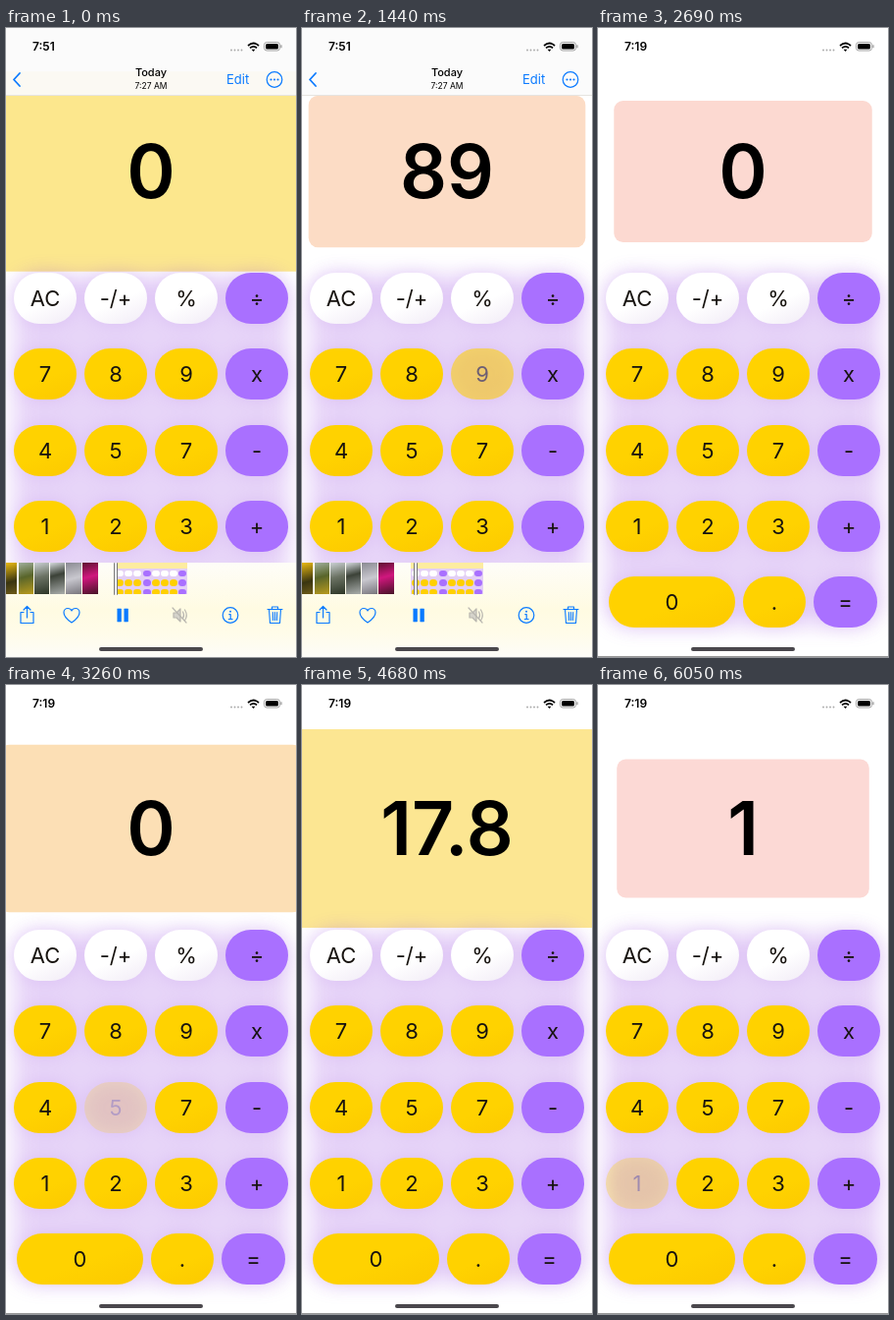
An HTML page for the animation above (6090 ms loop, 296x640 px).

```html
<!DOCTYPE html>
<html lang="en">
<head>
<meta charset="utf-8">
<title>Calculator</title>
<style>
html, body { margin: 0; width: 100%; height: 100%; overflow: hidden; background: #fff; }
body { position: relative; font-family: Inter, Roboto, sans-serif; color: #000; }
#stage { position: absolute; left: 0; top: 0; width: 296px; height: 640px; overflow: hidden; background: #fff; }
#stage div, #stage svg { position: absolute; }
#panel { left: 20px; top: 76px; width: 256px; height: 140px; border-radius: 9px; }
#glow { inset: 0; }
#haze { left: 7px; top: 252px; width: 282px; height: 356px; border-radius: 24px; background: #a35be4; opacity: .25; filter: blur(11px); }
#shades { inset: 0; opacity: .16; filter: blur(9px); }
#value { left: 0; width: 296px; top: 101px; line-height: 90px; font-size: 75px; font-weight: 600; text-align: center; }
.key { height: 52px; line-height: 52px; border-radius: 26px; font-size: 22px; text-align: center; color: #17130f; }
.white { background: linear-gradient(155deg, #fff 55%, #f1ebf6); }
.gold { background: linear-gradient(160deg, #ffd200 55%, #fcc900); }
.violet { background: #a970ff; }
#chrome { inset: 0; }
#head { left: 0; top: 0; width: 296px; height: 68px; background: rgba(251,251,251,.93); border-bottom: 1px solid #e6e4e0; }
#foot { left: 0; top: 544px; width: 296px; height: 96px; background: linear-gradient(#fefdf8, #fffbe2 50%, #fffce9 75%, #fdfcf8); }
.mid { left: 0; width: 296px; text-align: center; }
.thumb { top: 0; height: 32px; }
#strip { left: 111px; top: 0; width: 74px; height: 32px; overflow: hidden; background: #e3cff6; }
#head1 { top: 0; left: 0; width: 2px; height: 33px; background: #fff; border: solid #777; border-width: 0 1px; border-radius: 1px; }
#clock { left: 27px; top: 11px; line-height: 16px; font-size: 12px; font-weight: 600; }
#home { left: 95px; top: 630px; width: 106px; height: 3.5px; border-radius: 2px; background: #4a474c; }
#edge { left: 0; top: 639px; width: 296px; height: 1px; background: #999; }
</style>
</head>
<body>
<div id="stage">
  <div id="panel"></div>
  <div id="glow"><div id="haze"></div><div id="shades"></div></div>
  <div id="value"></div>
  <div id="keys"></div>
  <div id="edge"></div>
  <div id="chrome">
    <div id="head">
      <div class="mid" style="top:38px;font-size:11px;line-height:15px;font-weight:500">Today</div>
      <div class="mid" style="top:53px;font-size:8.5px;line-height:12px">7:27 AM</div>
      <div style="left:225px;top:43px;font-size:13px;line-height:18px;color:#0a7aff">Edit</div>
    </div>
    <div id="foot"><div id="strip"></div><div id="head1"></div></div>
    <svg width="296" height="640" fill="none" stroke="#0a7aff" stroke-width="1.2" stroke-linecap="round" stroke-linejoin="round">
      <path d="M14 46 L8 52.500 L14 59" stroke-width="1.8"/>
      <circle cx="274" cy="52.500" r="7.800"/>
      <path d="M270.500 52.500h.01M274 52.500h.01M277.500 52.500h.01" stroke-width="2.200"/>
      <path d="M18 594.500h-3v11h13v-11h-3M21.500 600v-11M18 592l3.500-3.500 3.500 3.500"/>
      <path d="M67 605C55 597 59 590.500 63 590.500Q66 590.500 67 593Q68 590.500 71 590.500C75 590.500 79 597 67 605Z"/>
      <path d="M114 591h3.500v13h-3.500zM121 591h3.500v13h-3.500z" fill="#0a7aff" stroke-width=".6"/>
      <g stroke="#b9b7b0">
        <path d="M171 595h3l4-4v13l-4-4h-3z" fill="#d5d3cb"/>
        <path d="M180.500 594q2 3.500 0 7M182.500 592q3.500 5.500 0 11M170 590l14 15"/>
      </g>
      <circle cx="229" cy="597.500" r="7.800"/>
      <path d="M229 593.700h.01" stroke-width="2"/>
      <path d="M227.800 596.700h1.400v4.800M227.300 601.500h3.800"/>
      <path d="M267 591.500h15M271.500 591.500v-2.500h6v2.500M268.500 591.500l1 14h10l1-14M272.300 594.500l.3 8M274.500 594.500v8M276.700 594.500l-.3 8" stroke-width="1.1"/>
    </svg>
  </div>
  <div id="clock"></div>
  <svg width="296" height="40" fill="none" stroke="#000">
    <path d="M230 22.500h.01M233.500 22.500h.01M237 22.500h.01M240.500 22.500h.01" stroke="#aaa" stroke-width="1.900" stroke-linecap="round"/>
    <path d="M247 18q5.500-5 11 0M249 20.300q3.500-3 7 0" stroke-width="1.700"/>
    <path d="M250.600 21.700h3.800l-1.900 2.300z" fill="#000" stroke="none"/>
    <rect x="263.500" y="14.500" width="16" height="8.500" rx="2.700" stroke="#999" stroke-width=".9"/>
    <rect x="265" y="16" width="13" height="5.500" rx="1.500" fill="#000" stroke="none"/>
    <path d="M281 17.300v3" stroke="#999" stroke-width="1.200"/>
  </svg>
  <div id="home"></div>
</div>
<script>
const LOOP = 6090, SWITCH = 2050, SWING = 2000;
const $ = id => document.getElementById(id);

function box(parent, cls, css, text = '') {
  const el = document.createElement('div');
  el.className = cls;
  el.style.cssText = css;
  el.textContent = text;
  parent.append(el);
  return el;
}

// Keypad
const keys = {};
function addKey(label, kind, x, y, w = 64) {
  const css = `left:${x}px;top:${y}px;width:${w}px;`;
  box($('shades'), 'key', css + 'background:#9a50e0');
  keys[label] = box($('keys'), 'key ' + kind, css, label);
}
const rows = [['AC', '-/+', '%', '÷'], ['7', '8', '9', 'x'], ['4', '5', '7', '-'], ['1', '2', '3', '+']];
rows.forEach((row, r) => row.forEach((label, c) =>
  addKey(label, c === 3 ? 'violet' : r ? 'gold' : 'white', 8 + 72 * c, 249 + 77.3 * r)));
addKey('0', 'gold', 11, 558, 129);
addKey('.', 'gold', 148, 558);
addKey('=', 'violet', 220, 558, 65);

// Film strip
const thumbs = [
  [0, 11, '#e8b912,#3a3510 60%,#6d5a18'],
  [13, 15, '#9fae9b,#59652a 45%,#b89a1e'],
  [29, 15, '#c9cfd2,#6c7364 45%,#2c3526'],
  [45, 15, '#d4d9dc,#3c4238 40%,#a9adab'],
  [61, 16, '#8a8a92,#c9c8cf 50%,#77757c'],
  [78, 16, '#5e1030,#d0177e 45%,#461226']
];
for (const [x, w, tones] of thumbs)
  box($('foot'), 'thumb', `left:${x}px;width:${w}px;background:linear-gradient(165deg,${tones})`);
box($('strip'), '', 'left:0;top:0;width:74px;height:6px;background:#fdeca0');
for (let r = 0; r < 3; r++)
  for (let c = 0; c < 8; c++) {
    const tone = c % 4 === 3 ? '#a970ff' : r ? '#ffd000' : '#fff';
    box($('strip'), '', `left:${1 + c * 9.2}px;top:${7.5 + r * 9.7}px;width:8px;height:6.5px;border-radius:4px;background:${tone}`);
  }
$('foot').append($('head1'));

// Release time, key, value shown from then on
const taps = [
  [700, '8', '8'], [1330, '9', '89'], [2370, '÷', '0'], [3330, '5', '5'],
  [4280, '=', '17.8'], [5130, 'AC', '0'], [6020, '1', '1']
];
const clamp = v => Math.min(1, Math.max(0, v));
const mix = (a, b, k) => a + (b - a) * k;
const pink = [252, 216, 216], yellow = [252, 231, 140];

function keyOpacity(dt) {
  return dt < 0 ? mix(1, .2, clamp((dt + 130) / 50)) : mix(.2, 1, clamp(dt / 250));
}

function draw(t) {
  const viewer = t < SWITCH;
  const peak = viewer ? 110 : 4310;
  const k = (1 + Math.cos(Math.PI * (t - peak) / SWING)) / 2;
  const height = mix(138, viewer ? 204 : 208, k);
  $('panel').style.transform = `scale(${height / 140})`;
  $('panel').style.background = `rgb(${pink.map((v, i) => Math.round(mix(v, yellow[i], k)))})`;

  let shown = '0';
  for (const [at, key, value] of taps) {
    if (t >= at) shown = value;
    keys[key].style.opacity = keyOpacity(t - at);
  }
  $('value').textContent = shown;

  $('chrome').style.opacity = viewer ? 1 : .5 * (1 - clamp((t - SWITCH) / 180));
  $('edge').style.opacity = viewer ? 0 : 1;
  $('clock').textContent = viewer ? '7:51' : '7:19';
  $('head1').style.left = 110 + t / 360 + 'px';
}

const start = performance.now();
function tick() {
  draw((performance.now() - start) % LOOP);
  requestAnimationFrame(tick);
}
tick();
</script>
</body>
</html>
```
